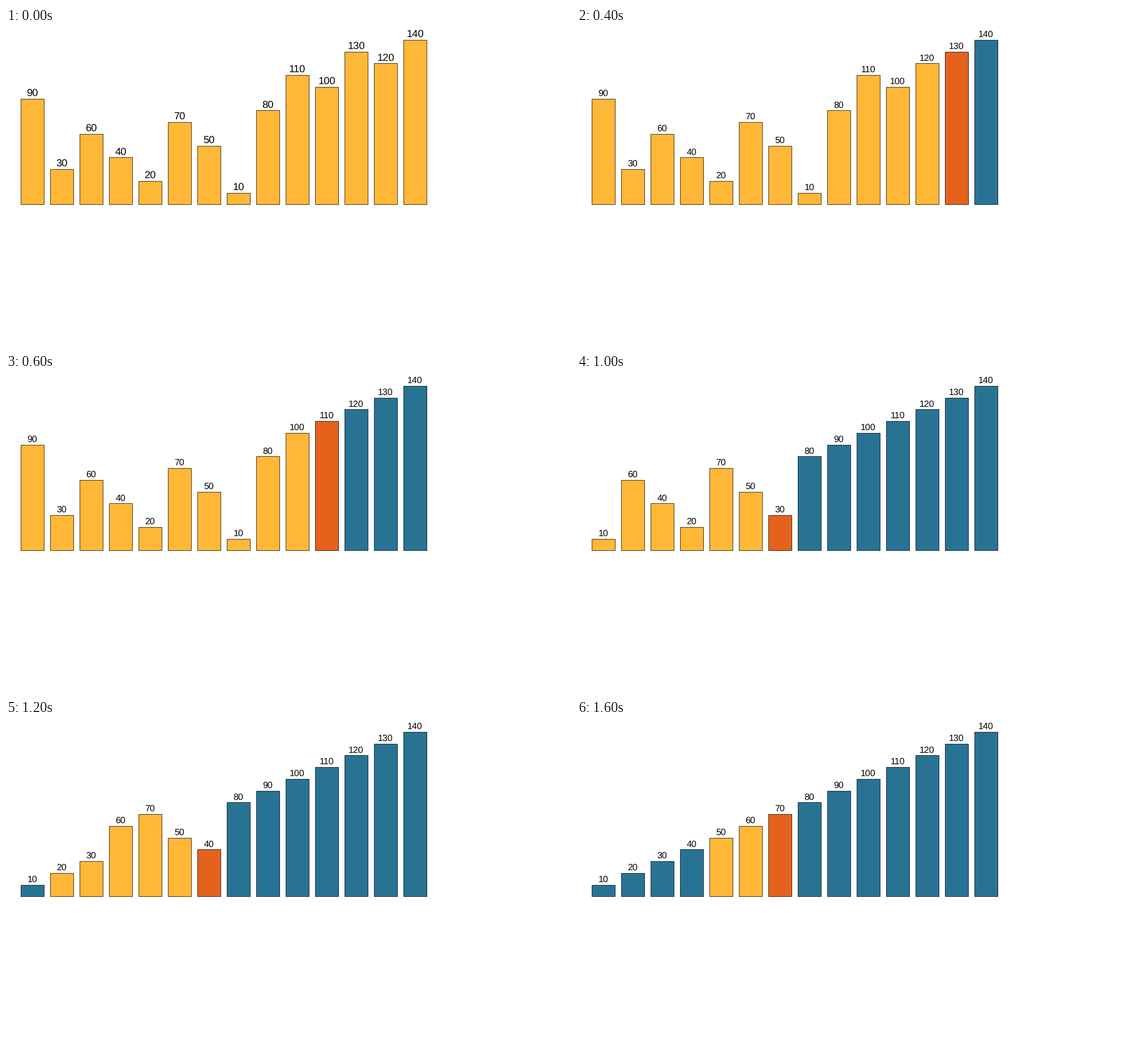
Write a matplotlib script that moves like this. It is 998 by 561 pixels and loops after 1.8 s.

```python
import matplotlib.pyplot as plt
from matplotlib.animation import FuncAnimation
from matplotlib.patches import Rectangle

WIDTH, HEIGHT, DPI = 998, 561, 64
PX = 72 / DPI  # points per pixel
VALUES = [90, 30, 60, 40, 20, 70, 50, 10, 80, 110, 100, 130, 120, 140]
YELLOW, ORANGE, BLUE = "#ffb738", "#e5621d", "#287394"
LEFT, PITCH, BAR_WIDTH = 26, 52, 41
BASE, SCALE = 311.3, 2.075

plt.rcParams["text.hinting"] = "no_hinting"


def partition(a, lo, hi):
    """Move the last item of a[lo..hi] to its sorted place."""
    p = lo
    for j in range(lo, hi):
        if a[j] < a[hi]:
            a[p], a[j] = a[j], a[p]
            p += 1
    a[p], a[hi] = a[hi], a[p]
    return p


def quicksort_steps(values):
    """List (array, active index, settled indices) after each partition."""
    a, done = list(values), set()
    steps = [(list(a), None, set())]
    stack = [(0, len(a) - 1)]
    while stack:
        lo, hi = stack.pop()
        p = partition(a, lo, hi)
        steps.append((list(a), hi, set(done)))
        done.add(p)
        for start, end in ((lo, p - 1), (p + 1, hi)):
            if start == end:
                done.add(start)
            elif start < end:
                stack.append((start, end))
    return steps


STEPS = quicksort_steps(VALUES)

fig = plt.figure(figsize=(WIDTH / DPI, HEIGHT / DPI), dpi=DPI, facecolor="white")
ax = fig.add_axes([0, 0, 1, 1])
ax.set_xlim(0, WIDTH)
ax.set_ylim(HEIGHT, 0)
ax.axis("off")

bars, labels = [], []
for i in range(len(VALUES)):
    x = LEFT + i * PITCH
    bar = Rectangle((x, BASE), BAR_WIDTH, 0, edgecolor="black",
                    linewidth=0.75 * PX, snap=True)
    bars.append(ax.add_patch(bar))
    labels.append(ax.text(x + BAR_WIDTH / 2, 0, "", ha="center", va="baseline",
                          family="Liberation Sans", color="black"))


def draw(frame):
    values, active, done = STEPS[frame]
    size = 18.4 if frame == 0 else 16
    for i, (value, bar, label) in enumerate(zip(values, bars, labels)):
        top = BASE - value * SCALE
        bar.set_y(top)
        bar.set_height(BASE - top)
        bar.set_facecolor(ORANGE if i == active else BLUE if i in done else YELLOW)
        label.set_text(str(value))
        label.set_y(top - 4.8)
        label.set_fontsize(size * PX)
    return bars + labels


anim = FuncAnimation(fig, draw, frames=len(STEPS), interval=200,
                     repeat=True, repeat_delay=0, blit=False)
plt.show()
```
